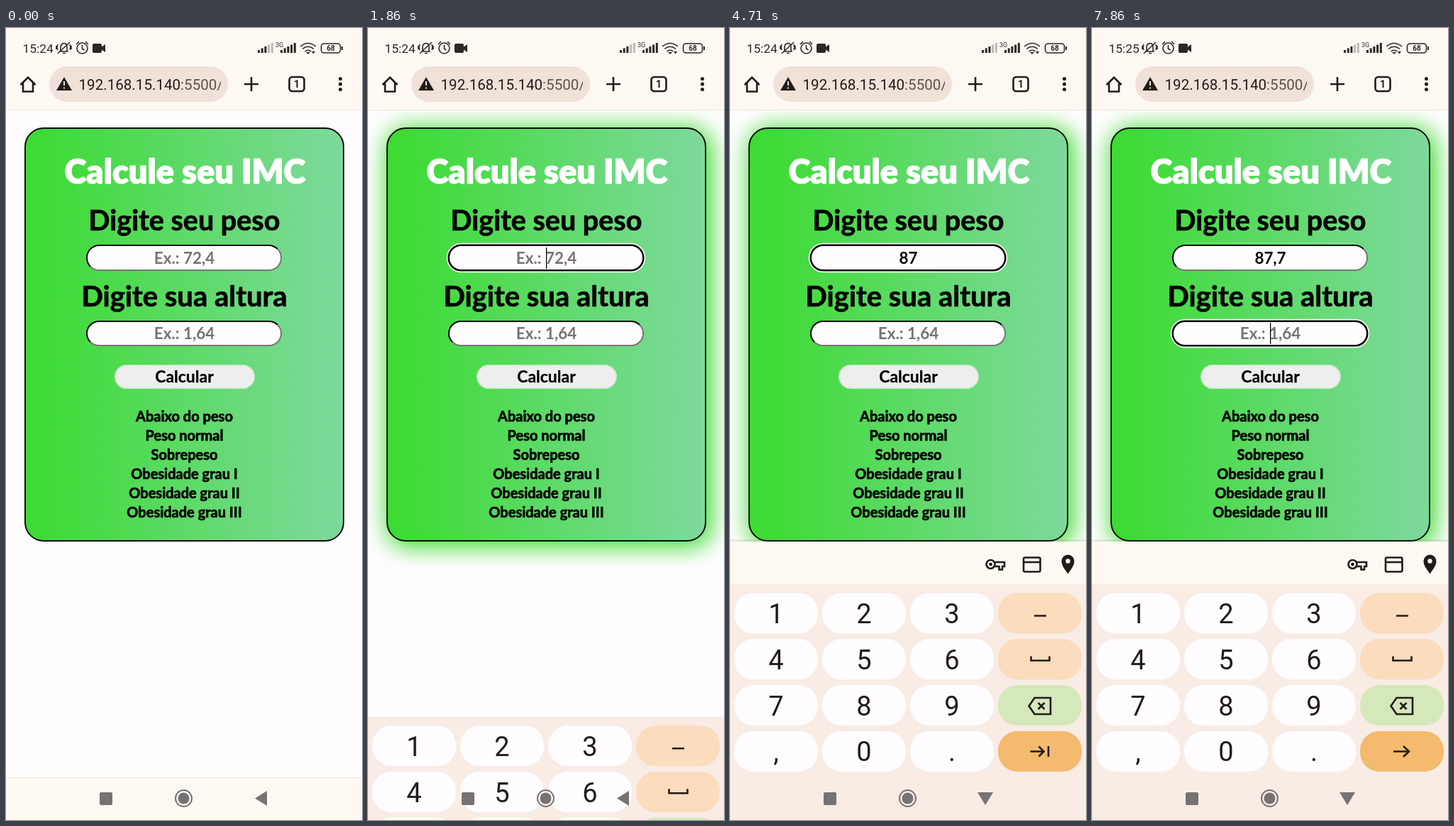
An HTML page for the animation above (8000 ms loop, 502x1115 px).

```html
<!DOCTYPE html>
<html lang="pt-BR">
<head>
<meta charset="utf-8">
<title>Calcule seu IMC</title>
<style>
  html, body { margin: 0; width: 100%; height: 100%; overflow: hidden; background: #fffdff; }
  div, svg { position: absolute; box-sizing: border-box; }
  svg { left: 0; top: 0; }
  #card { left: 25.5px; top: 140px; width: 451.5px; height: 582.5px; border: 2.4px solid #050a05; border-radius: 27px;
    background: linear-gradient(90deg, #3ddb33 4%, #7dd99b 98%); }
  .field { left: 112.7px; width: 276.8px; height: 36.8px; border: 2.4px solid; border-color: #000 #767676 #767676 #000;
    border-radius: 18.4px; background: #fffdff; }
  .field.focus { border-color: #000; box-shadow: 0 0 0 .6px #000, 0 0 0 2.2px #fff; }
  #button { left: 152.5px; top: 473.7px; width: 198px; height: 34.5px; border: 2px dotted #b4e9b6; border-radius: 17px; background: #efeeef; }
  text { font-family: Roboto, sans-serif; }
  .page text { font-family: Lato, sans-serif; font-weight: 700; text-anchor: middle; stroke-linejoin: round; }
  .line { fill: none; stroke: #211c19; stroke-width: 2.6; }
  .thin { fill: none; stroke: #2b2724; stroke-width: 1.6; }
</style>
</head>
<body>
<div id="card"></div>
<div class="field" style="top:305.4px"></div>
<div class="field" style="top:411.6px"></div>
<div id="button"></div>
<svg width="502" height="1115" viewBox="0 0 502 1115">
  <g class="page">
    <text x="252.5" y="219" font-size="47" style="font-weight:900" fill="#fff" stroke="#fff" stroke-width="1.2">Calcule seu IMC</text>
    <g stroke="#000" stroke-width=".7">
      <text x="251.5" y="285" font-size="39.5">Digite seu peso</text>
      <text x="251.5" y="391.5" font-size="40">Digite sua altura</text>
      <text x="251.5" y="498.5" font-size="23" stroke-width=".3">Calcular</text>
      <g id="list" font-size="20"></g>
    </g>
    <text id="weight" x="251.5" y="331.5" font-size="22.4"></text>
    <text x="251.5" y="438" font-size="22.4" fill="#767176">Ex.: 1,64</text>
    <rect id="caret" width="1.3" height="30"/>
  </g>

  <path d="M0 0h502v115H0z" fill="#fef8f3"/>
  <path d="M0 115.5h502" stroke="#f3e2d6"/>
  <g id="status" fill="#2b2724">
    <text id="clock" x="23.5" y="35" font-size="17.4"></text>
    <path class="thin" d="M75 33h13M77 33v-6q0-5 5-5.500q4 .5 4 5.500v6M80 35.500h4M73 36l17-16M73 23q-2 4 0 8M90 23q2 4 0 8M71 25v5M92 25v5"/>
    <circle class="thin" cx="107.500" cy="28.500" r="7.500"/>
    <path class="thin" d="M107.500 24v5l3 2M99 23l4-4M116 23l-4-4"/>
    <path d="M124 22h9q2 0 2 2v2.500l5-3.500v11l-5-3.500v2.500q0 2-2 2h-9q-2 0-2-2v-9q0-2 2-2z"/>
    <text x="380" y="27" font-size="9">3G</text>
    <path class="thin" d="M415 26q11-9 22 0M418 29.500q8-6.500 16 0M421.500 33q4.500-3.600 9 0"/>
    <path d="M423 34h6l-3 3z"/>
    <path id="traffic" d="M431 33h5l-2.500 3.500z"/>
    <rect class="thin" x="444.500" y="22" width="27" height="13" rx="4"/>
    <path d="M473 26h2v5h-2z"/>
    <text x="458" y="32.300" font-size="10" font-weight="700" text-anchor="middle">68</text>
  </g>
  <path class="line" d="M20.500 80l10.500-10.500 10.500 10.500M24 77v12.500h14V77"/>
  <rect x="61" y="54" width="252" height="50" rx="25" fill="#f0e2d9"/>
  <path d="M82 69l11 19H71z" fill="#211c19"/>
  <path d="M82 75v6M82 83.500v2" stroke="#f0e2d9" stroke-width="2"/>
  <svg width="303" height="115"><text x="102.500" y="87" font-size="20.600" fill="#211c19">192.168.15.140<tspan fill="#5c524c">:5500/</tspan></text></svg>
  <path class="line" d="M336 79h20M346 69v20"/>
  <rect class="line" x="399.500" y="69" width="21" height="20" rx="4"/>
  <text x="410" y="84.200" font-size="14" font-weight="700" text-anchor="middle" fill="#211c19">1</text>
  <path d="M471.500 71.500v.01M471.500 79v.01M471.500 86.500v.01" stroke="#211c19" stroke-width="5" stroke-linecap="round"/>

  <path d="M0 1055h502v60H0z" fill="#fef8f3"/>
  <path d="M0 1055.500h502" stroke="#f3e2d6"/>
  <g id="keyboard">
    <path d="M0 783h502v332H0z" fill="#f8ece5"/>
    <g id="keys" font-size="38" text-anchor="middle" fill="#211c19"></g>
    <path class="line" d="M429 827.500h17M424.500 884.500v6h26v-6"/>
    <path class="line" d="M421.500 954.500l8-11.500h22.500v23h-22.500zM434.500 950l9 9m0-9l-9 9"/>
    <path class="line" id="next"/>
  </g>
  <g id="suggest">
    <path d="M0 720h502v3H0z" fill="#765" opacity=".12"/>
    <path d="M0 723h502v60.500H0z" fill="#fef8f3"/>
    <circle class="line" cx="367.500" cy="755" r="6"/>
    <circle cx="367.500" cy="755" r="2.300"/>
    <path class="line" d="M373 752h14v6h-3v4.500h-4.500V758H373"/>
    <rect class="line" x="414" y="745.500" width="23.500" height="20" rx="2"/>
    <path class="line" d="M414 752h23.500"/>
    <path d="M476.500 768.500c-5-7-9-12-9-18a9 9 0 0 1 18 0c0 6-4 11-9 18z" fill="#211c19"/>
    <circle cx="476.500" cy="750.500" r="3.200" fill="#fef8f3"/>
  </g>
  <g fill="#777273">
    <rect x="132" y="1076" width="18" height="18" rx="2"/>
    <circle cx="250.500" cy="1084.500" r="8"/>
    <circle cx="250.500" cy="1084.500" r="11.500" fill="none" stroke="#777273" stroke-width="2"/>
    <path id="back"/>
  </g>
  <circle id="touch" r="14" fill="#fff" fill-opacity=".25" stroke="#6a6262" stroke-opacity=".2" stroke-width="2.800"/>
</svg>
<script>
const $ = id => document.getElementById(id);
const LOOP = 8000, KEYBOARD_START = 1780, KEYBOARD_END = 2104, CLOCK_TICK = 5430;

// Each tap: time it takes effect, position, weight typed so far, index of the key hit
const taps = [
  { at: 1635, x: 256, y: 325, value: '', key: -1 },
  { at: 2860, x: 178, y: 948, value: '8', key: 9 },
  { at: 4000, x: 50, y: 947, value: '87', key: 8 },
  { at: 5570, x: 58, y: 1016, value: '87,', key: 12 },
  { at: 6240, x: 47, y: 946, value: '87,7', key: 8 },
  { at: 7430, x: 432, y: 1017, value: '87,7', key: 15, second: true },
];

$('list').innerHTML = ['Abaixo do peso', 'Peso normal', 'Sobrepeso', 'Obesidade grau I', 'Obesidade grau II', 'Obesidade grau III']
  .map((label, i) => `<text x="251.5" y="${553.5 + 27 * i}">${label}</text>`).join('');

const bars = (x, strong) => [0, 1, 2, 3, 4].map(i => {
  const h = 4 + 2.5 * i;
  return `<rect x="${x + 4.7 * i}" y="${35 - h}" width="3" height="${h}" opacity="${i < strong ? 1 : .3}"/>`;
}).join('');
$('status').insertAdjacentHTML('beforeend', bars(355, 3) + bars(387, 5));

const sideColors = ['#fbdcbc', '#fbdcbc', '#d5e8ba', '#f4ba6e'];
$('keys').innerHTML = [...'123 456 789 ,0. '].map((label, i) => {
  const col = i % 4, row = i >> 2, x = 6 + 124 * col, y = 795.5 + 64.8 * row;
  return `<rect x="${x}" y="${y}" width="118" height="57" rx="27" fill="${col < 3 ? '#fffdff' : sideColors[row]}"/>
    <text x="${x + 59}" y="${y + 42.5}">${label}</text>`;
}).join('');
const keyRects = $('keys').querySelectorAll('rect');
const fields = document.querySelectorAll('.field');

const clamp = v => Math.max(0, Math.min(1, v));
const show = (id, on) => $(id).style.display = on ? '' : 'none';

function draw(t) {
  const last = taps.filter(tap => tap.at <= t).pop();
  const touch = taps.find(tap => t >= tap.at - 55 && t < tap.at + 185);
  const second = !!last?.second, value = last?.value || '';

  $('clock').textContent = t < CLOCK_TICK ? '15:24' : '15:25';
  show('traffic', t < 6140 || t >= 6430);
  const glow = clamp((t - 1635) / 200);
  $('card').style.boxShadow = `4px 4px 33px 4px rgba(61,220,48,${glow})`;

  fields[0].classList.toggle('focus', !!last && !second);
  fields[1].classList.toggle('focus', second);
  $('weight').textContent = value || 'Ex.: 72,4';
  $('weight').setAttribute('fill', value ? '#000' : '#767176');
  show('caret', last && (t - last.at) % 1000 < 500);
  const caretX = 251 + (value && !second ? $('weight').getComputedTextLength() / 2 + .5 : 0);
  $('caret').setAttribute('x', caretX);
  $('caret').setAttribute('y', second ? 415 : 309);

  const rise = clamp((t - KEYBOARD_START) / (KEYBOARD_END - KEYBOARD_START));
  $('keyboard').setAttribute('transform', `translate(0 ${332 * (1 - rise) ** 2})`);
  show('keyboard', rise > 0);
  show('suggest', rise === 1);
  $('back').setAttribute('d', rise === 1 ? 'M349 1076h22l-11 18z' : 'M368 1074v21l-17-10.500z');
  $('next').setAttribute('d', second
    ? 'M425 1018.500h22m-8-7.500l8 7.500-8 7.500'
    : 'M423.500 1018.500h19m-7-7l7 7-7 7M449 1011v15');

  show('touch', touch);
  if (touch) $('touch').setAttribute('transform', `translate(${touch.x} ${touch.y})`);
  keyRects.forEach((rect, i) => {
    rect.style.filter = touch?.key === i && t < touch.at + 40 ? 'brightness(.92)' : '';
  });
}

const start = performance.now();
function tick() {
  draw((performance.now() - start) % LOOP);
  requestAnimationFrame(tick);
}
tick();
</script>
</body>
</html>
```
